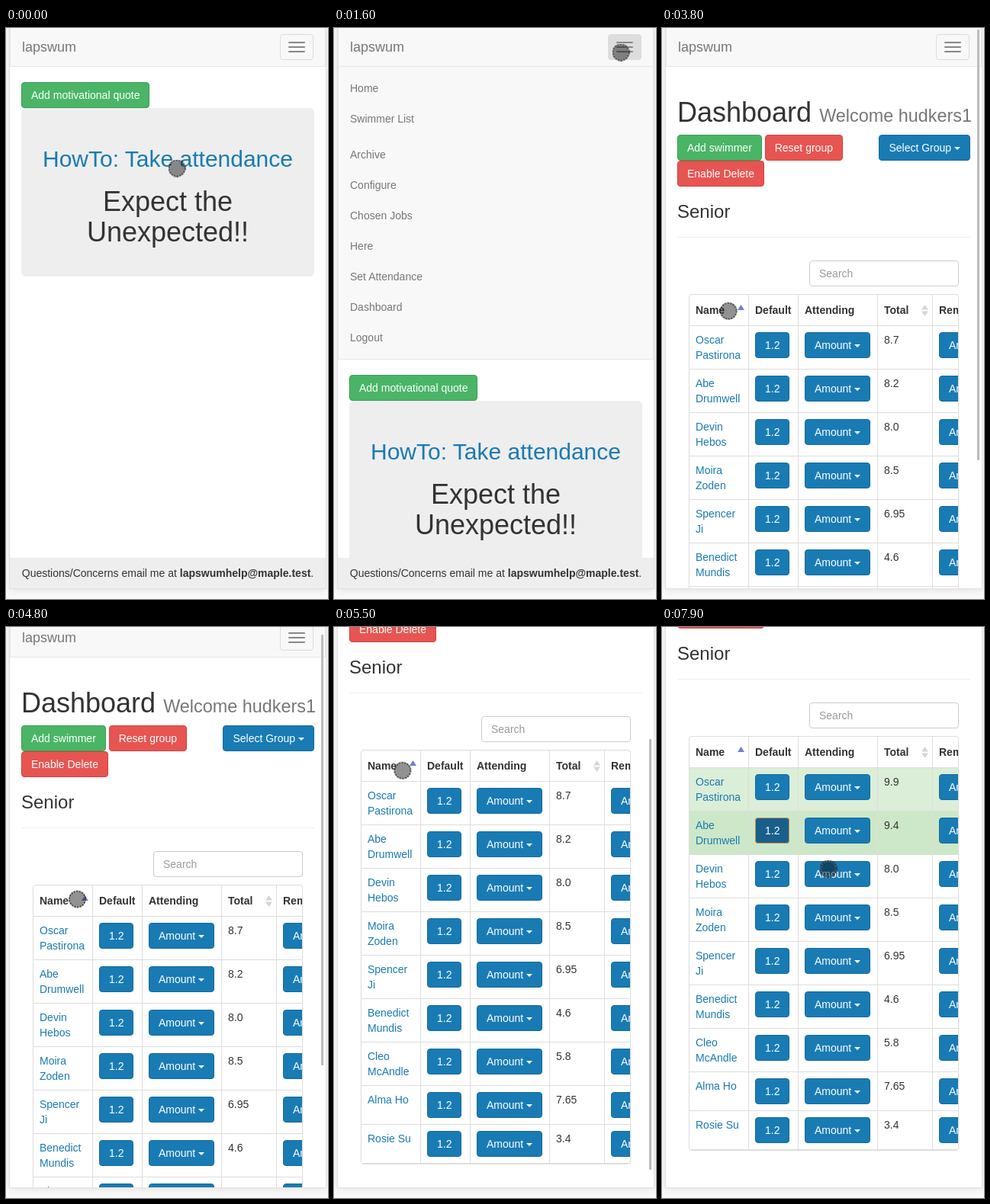
An HTML page that plays this animation: 422x749 px, repeating every 8 s.

```html
<!DOCTYPE html>
<html lang="en">
<head>
<meta charset="utf-8">
<title>Swim club dashboard</title>
<style>
* { box-sizing: border-box; }
html, body { margin: 0; width: 100%; height: 100%; overflow: hidden; }
body { position: relative; background: #f9f9f9; color: #333; font: 14px/20px "Liberation Sans", Arial, sans-serif; }
h1, h2, h3 { margin: 0; font-weight: 500; font-weight: normal; line-height: 1.1; white-space: nowrap; }
h1 { font-size: 36px; }
h1 small { font-size: 65%; line-height: 1; color: #777; }
h2 { font-size: 30px; color: #197ab2; }
h3 { font-size: 24px; }

.phone { position: absolute; left: 5px; top: 0; width: 414px; height: 735px; overflow: hidden; background: #fff; }
.frame { position: absolute; left: 5px; top: -10px; width: 414px; height: 745px; box-shadow: 0 0 0 1px #e2e2e2, 0 2px 10px rgba(0,0,0,.1); }

/* One loop is 8 s, so 1.25% is 100 ms */
.scroll, .bar, .menu, .home, .dash, .toggle, .picked, .row1, .row2, .cursor, .ring, .arrow {
  animation: 8s step-end infinite;
}
.scroll { --k: -1px; animation-name: scroll; }

nav { position: relative; z-index: 1; background: #f8f8f8; border: solid #e7e7e7; border-width: 0 1px 1px; }
.brand { height: 50px; padding: 15px; font-size: 18px; color: #777; }
.toggle { position: absolute; right: 15px; top: 8px; width: 44px; height: 34px; padding: 5px 10px; border: 1px solid #ddd; border-radius: 4px; animation-name: toggle; }
.toggle i { display: block; width: 22px; height: 2px; margin-top: 4px; border-radius: 1px; background: #888; }
.menu { height: 0; overflow: hidden; color: #777; animation-name: open; }
.menu div { border-top: 1px solid #e7e7e7; padding-bottom: 7.5px; }
.menu p { margin: 0; padding: 10px 15px; }
.menu .gap { margin-top: 7.5px; }
.picked { animation-name: picked; }

.home { animation-name: leave; }
.intro { padding: 20px 15px; }
.jumbo { height: 221px; padding-top: 50px; border-radius: 6px; background: #eee; text-align: center; }
.jumbo h1 { margin-top: 20px; }
footer { position: absolute; z-index: 2; left: 0; right: 0; bottom: 0; height: 40px; padding: 10px 0; background: #eee; text-align: center; white-space: nowrap; }

.btn { display: inline-block; vertical-align: top; padding: 6px 12px; border: 1px solid #166a9b; border-radius: 4px; background: #197bb4; color: #fff; white-space: nowrap; }
.green { background: #4ab566; border-color: #3b9d55; }
.red { background: #e65551; border-color: #d9403c; }
.right { float: right; }
.caret { display: inline-block; vertical-align: middle; border: 4px solid transparent; border-top-color: currentColor; border-bottom: 0; }

.dash { position: absolute; left: 15px; top: 91px; width: 384px; height: 850px; animation-name: enter; }
.tools { height: 68px; margin: 9.4px 0 20px; }
hr { height: 1px; margin: 20px 0 30px; border: 0; background: #eee; }
.search { width: 196px; height: 34px; margin: 0 0 0 173px; padding: 6px 12px; border: 1px solid #ccc; border-radius: 4px; color: #999; }
.table { position: absolute; left: 15px; top: 258px; width: 354px; height: 544px; overflow: hidden; border: 1px solid #ddd; border-radius: 4px; }
.row { display: grid; grid-template-columns: 77px 65px 104px 72px 120px; width: 438px; height: 57px; border-top: 1px solid #ddd; background: var(--tint); }
.row > * { position: relative; padding: 8px; border-left: 1px solid #ddd; }
.row > :first-child { border-left: 0; color: #197ab2; }
.row.short { height: 51px; }
.row:last-child { height: 52px; border-bottom: 1px solid #ddd; }
.row.head { height: 40px; border-top: 0; font-weight: bold; }
.row.head > * { padding: 10px 8px; color: #333; }
.head svg { position: absolute; right: 5px; top: 13px; width: 9px; height: 15px; }
.total { height: 20px; overflow: hidden; }
.total span { display: block; translate: 0 var(--turn, 0); }
.quick { background: var(--btn, #197bb4); outline: 1.5px solid var(--ring, transparent); outline-offset: -1px; }
.row1 { animation-name: row1; }
.row2 { animation-name: row2; }

.bar { --k: .772px; position: absolute; left: 408px; top: 2px; width: 3px; height: 565px; border-radius: 1px; background: #bcbcbc; animation-name: scroll, fade; }
.cursor { position: absolute; left: -11.5px; top: -11.5px; width: 23px; height: 23px; animation-name: move; }
.ring { display: block; animation-name: ring; }
.arrow { position: absolute; left: 82px; top: 366px; animation-name: arrow; }

@keyframes move {
  0%, 2.5% { translate: 223.5px 183.5px; animation-timing-function: steps(8); }
  12.5%, 20% { translate: 375.5px 31.5px; animation-timing-function: steps(4); }
  25% { translate: 134.5px 274.5px; animation-timing-function: steps(4); }
  30%, 32.5% { translate: 84.5px 379.5px; animation-timing-function: steps(2); }
  35%, 41.25% { translate: 81.5px 369.5px; }
  42.5%, 45% { translate: 84.5px 372px; animation-timing-function: steps(8); }
  55%, 57.5% { translate: 93px 367px; animation-timing-function: steps(2); }
  60% { translate: 93px 356.5px; animation-timing-function: steps(4); }
  65% { translate: 89px 239.5px; animation-timing-function: steps(4); }
  70%, 71.25% { translate: 89.5px 170.5px; }
  72.5%, 75% { translate: 124.5px 188.5px; animation-timing-function: steps(2); }
  77.5%, 82.5% { translate: 151.5px 212px; animation-timing-function: steps(4); }
  87.5%, 96.25% { translate: 150.5px 267px; animation-timing-function: steps(2); }
  98.75%, 100% { translate: 217.5px 316.5px; }
}
@keyframes scroll {
  0%, 58.75% { translate: 0 0; }
  60% { translate: 0 calc(11 * var(--k)); animation-timing-function: steps(4); }
  65% { translate: 0 calc(134 * var(--k)); animation-timing-function: steps(4); }
  70%, 100% { translate: 0 calc(206 * var(--k)); }
}
@keyframes fade {
  0%, 50%, 77.5%, 87.5%, 100% { opacity: 0; }
  42.5%, 58.75%, 80% { opacity: 1; }
  48.75%, 76.25%, 86.25% { opacity: .5; }
}
@keyframes open {
  0%, 41.25%, 100% { height: 0; }
  16.25% { height: 60px; }
  17.5% { height: 220px; }
  18.75% { height: 350px; }
  20% { height: 384px; }
}
@keyframes toggle { 0%, 38.75%, 100% { background: transparent; } 15% { background: #ddd; } }
@keyframes picked { 0%, 41.25%, 100% { color: #777; } 38.75% { color: #333; } }
@keyframes leave { 0% { visibility: visible; } 41.25%, 100% { visibility: hidden; } }
@keyframes enter { 0% { visibility: hidden; } 41.25%, 100% { visibility: visible; } }
@keyframes ring { 0%, 42.5%, 100% { visibility: visible; } 38.75% { visibility: hidden; } }
@keyframes arrow { 0%, 42.5%, 100% { visibility: hidden; } 38.75% { visibility: visible; } }
@keyframes row1 {
  0% { --tint: #fff; --turn: 0px; --btn: #197bb4; --ring: transparent; }
  80% { --tint: #fff; --turn: 0px; --btn: #174b6d; --ring: #c98d4d; }
  81.25% { --tint: #cde8c8; --turn: -20px; --btn: #174b6d; --ring: #c98d4d; }
  83.75% { --tint: #cde8c8; --turn: -20px; --btn: #185f8b; --ring: #c98d4d; }
  92.5%, 100% { --tint: #dbeed8; --turn: -20px; --btn: #197bb4; --ring: transparent; }
}
@keyframes row2 {
  0% { --tint: #fff; --turn: 0px; --btn: #197bb4; --ring: transparent; }
  92.5% { --tint: #fff; --turn: 0px; --btn: #174b6d; --ring: #c98d4d; }
  93.75% { --tint: #cde8c8; --turn: -20px; --btn: #174b6d; --ring: #c98d4d; }
  97.5%, 100% { --tint: #cde8c8; --turn: -20px; --btn: #185f8b; --ring: #c98d4d; }
}
</style>
</head>
<body>
<div class="frame"></div>
<div class="phone">
  <div class="scroll">
    <nav>
      <div class="brand">lapswum</div>
      <div class="toggle"><i></i><i></i><i></i></div>
      <div class="menu"><div>
        <p class="gap">Home</p><p>Swimmer List</p>
        <p class="gap">Archive</p><p>Configure</p><p>Chosen Jobs</p><p>Here</p>
        <p>Set Attendance</p><p class="picked">Dashboard</p><p>Logout</p>
      </div></div>
    </nav>
    <div class="home intro">
      <span class="btn green">Add motivational quote</span>
      <div class="jumbo">
        <h2>HowTo: Take attendance</h2>
        <h1>Expect the<br>Unexpected!!</h1>
      </div>
    </div>
    <div class="dash">
      <h1>Dashboard <small>Welcome hudkers1</small></h1>
      <div class="tools">
        <span class="btn right">Select Group <i class="caret"></i></span>
        <span class="btn green">Add swimmer</span> <span class="btn red">Reset group</span><br>
        <span class="btn red">Enable Delete</span>
      </div>
      <h3>Senior</h3>
      <hr>
      <div class="search">Search</div>
      <div class="table">
        <div class="row head">
          <div>Name<svg><path d="M0 7 4.5 0 9 7Z" fill="#6b80d2"/></svg></div>
          <div>Default</div>
          <div>Attending</div>
          <div>Total<svg><path d="M0 6.5 4.5 0 9 6.5ZM0 8.5H9L4.5 15Z" fill="#d6d6d6"/></svg></div>
          <div>Remove</div>
        </div>
      </div>
    </div>
  </div>
  <footer class="home">Questions/Concerns email me at <b>lapswumhelp@maple.test</b>.</footer>
  <div class="bar"></div>
</div>
<div class="cursor">
  <svg class="ring" width="23" height="23" viewBox="-11.5 -11.5 23 23" fill="none">
    <circle r="11.2" fill="#000" fill-opacity=".43"/>
    <circle r="10" stroke="#fff" stroke-opacity=".6"/>
    <circle r="10.3" stroke="#222" stroke-width="1.6" stroke-dasharray="2.2 1.4"/>
  </svg>
</div>
<svg class="arrow" width="16" height="22" viewBox="-2 -2 16 22">
  <path d="M0 0V15L3.5 12 6 17.5 8.5 16.5 6 11H10.5Z" fill="#111" stroke="#fff"/>
</svg>
<script>
const swimmers = [
  ["Oscar<br>Pastirona", "8.7<br>9.9"],
  ["Abe<br>Drumwell", "8.2<br>9.4"],
  ["Devin<br>Hebos", "8.0"],
  ["Moira<br>Zoden", "8.5"],
  ["Spencer<br>Ji", "6.95"],
  ["Benedict<br>Mundis", "4.6"],
  ["Cleo<br>McAndle", "5.8"],
  ["Alma Ho", "7.65"],
  ["Rosie Su", "3.4"]
];
const amount = '<div><span class="btn">Amount <i class="caret"></i></span></div>';
const row = ([name, total], i) => `
  <div class="row row${i + 1} ${name.includes("<br>") ? "" : "short"}">
    <div>${name}</div>
    <div><span class="btn quick">1.2</span></div>
    ${amount}
    <div><div class="total"><span>${total}</span></div></div>
    ${amount}
  </div>`;
document.querySelector(".table").insertAdjacentHTML("beforeend", swimmers.map(row).join(""));
</script>
</body>
</html>
```
